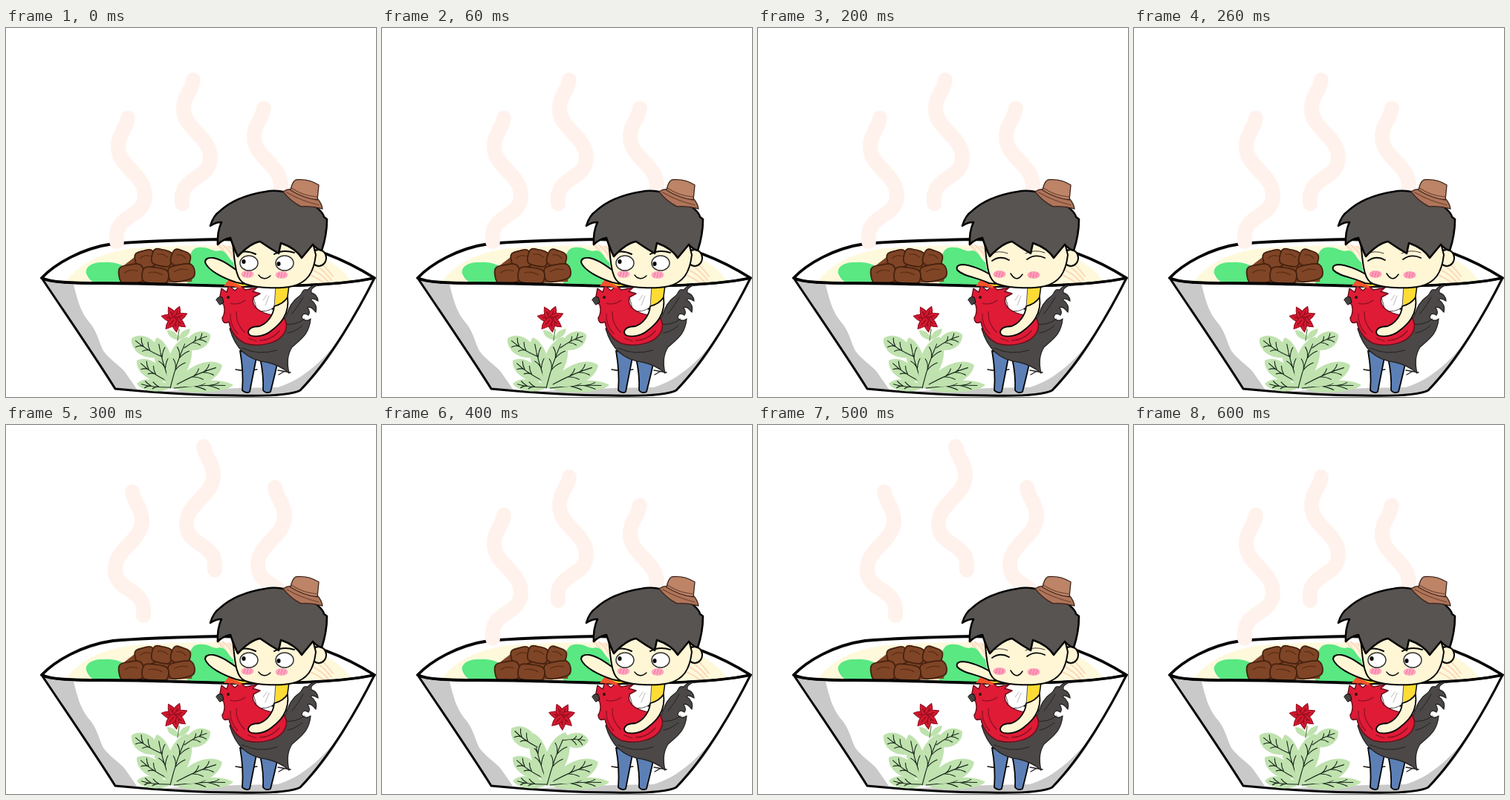
Animation of 498 by 496 pixels, one loop 700 ms. Source, as an HTML page with a canvas:

```html
<!DOCTYPE html>
<html>
<head>
<meta charset="utf-8">
<style>
html, body { margin: 0; width: 100%; height: 100%; overflow: hidden; background: #fff; }
canvas { display: block; width: 498px; height: 496px; }
</style>
</head>
<body>
<canvas id="c" width="498" height="496"></canvas>
<script>
const ctx = document.getElementById('c').getContext('2d');
ctx.lineCap = ctx.lineJoin = 'round';

const INK = '#050505', SKIN = '#fff6d6', RED = '#df1b36', DARK = '#4b4847';
const BROWN = '#7f4526', LEAF = '#bfe2ae', STEAM = '#fff2ec', SHADE = '#c9c9c9';

function shape(d, fill, stroke, w = 2) {
  const p = new Path2D(d);
  if (fill) { ctx.fillStyle = fill; ctx.fill(p); }
  if (stroke) { ctx.strokeStyle = stroke; ctx.lineWidth = w; ctx.stroke(p); }
}
function oval(x, y, rx, ry, fill, stroke, w = 2) {
  ctx.beginPath();
  ctx.ellipse(x, y, rx, ry, 0, 0, Math.PI * 2);
  if (fill) { ctx.fillStyle = fill; ctx.fill(); }
  if (stroke) { ctx.strokeStyle = stroke; ctx.lineWidth = w; ctx.stroke(); }
}
function at(x, y, turn, paint) {
  ctx.save();
  ctx.translate(x, y);
  ctx.rotate(turn);
  paint();
  ctx.restore();
}

const BODY = 'M48 336 C60 342 88 343 130 343 C210 343 260 347 330 347 C400 347 460 344 496 336 C476 376 438 444 396 487 C385 493 350 495 310 494 C250 494 190 489 147 485 C116 436 80 384 48 336 Z';
const INSIDE = 'M48 336 C66 317 102 296 144 290 C190 286 240 285 290 284 C350 285 400 293 432 304 C456 313 480 326 496 336 C460 344 400 347 330 347 C260 347 210 343 130 343 C88 343 60 342 48 336 Z';

function bowl() {
  shape(INSIDE, '#fff');
  ctx.save();
  ctx.clip(new Path2D(INSIDE));
  shape('M78 344 C98 316 130 301 172 296 C250 290 350 290 410 303 C440 312 458 328 466 344 Z', '#fff9dc');
  for (let i = 0; i < 4; i++) {
    shape(`M${392 + i * 3} ${299 + i * 10} Q422 ${308 + i * 9} ${440 - i * 2} ${334 + i * 5}`, null, '#fcd9b8', 2);
    shape(`M${284 + i * 8} ${290 + i * 2} Q${296 + i * 8} 300 ${304 + i * 8} 320`, null, '#fcdfc6', 3);
  }
  shape('M108 330 C106 320 118 314 132 315 C146 314 156 318 166 325 L166 345 L124 345 Q112 341 108 330 Z', '#59e882');
  shape('M246 318 C246 302 252 293 264 295 C274 294 278 302 288 299 C298 300 298 309 306 315 L312 348 L244 346 Z', '#59e882');
  ctx.restore();
  meat();
  shape(BODY, '#fff');
  shape('M50 339 C60 343 80 344 91 345 C96 365 100 380 110 393 C123 407 124 420 131 434 C142 449 157 455 164 468 L178 488 L147 485 C116 436 80 384 50 339 Z', SHADE);
  shape('M200 489 Q280 484 366 483 C408 470 440 434 466 393 C446 430 424 463 396 487 C385 493 350 495 310 494 Q250 494 200 489 Z', SHADE);
  shape(INSIDE, null, INK, 3.8);
  shape(BODY, null, INK, 3);
}

// Chunk of meat centred on (x,y)
function chunk(x, y, rx, ry, turn) {
  at(x, y, turn, () => {
    shape(`M${-rx} 0 C${-rx} ${-ry * 1.2} ${-rx * .6} ${-ry} 0 ${-ry} C${rx * .8} ${-ry} ${rx} ${-ry * .8} ${rx} 0 C${rx} ${ry} ${rx * .7} ${ry} 0 ${ry} C${-rx * .8} ${ry} ${-rx} ${ry * .9} ${-rx} 0 Z`, BROWN, '#45210f', 1.8);
    shape(`M${-rx * .5} ${-ry * .3} Q0 ${-ry * .6} ${rx * .5} ${-ry * .2}`, null, '#5c2e16', 1.3);
  });
}
function meat() {
  shape('M152 337 L160 318 L182 301 L238 302 L253 322 L250 341 L158 344 Z', BROWN);
  chunk(188, 311, 14, 12, -.3);
  chunk(210, 309, 14, 11, .2);
  chunk(235, 310, 13, 11, .3);
  chunk(169, 331, 17, 13, -.2);
  chunk(236, 329, 18, 11, -.2);
  chunk(201, 333, 18, 11, .1);
}

// One wavy plume; dir -1 mirrors it
function plume(x, y, dir) {
  ctx.save();
  ctx.translate(x, y);
  ctx.scale(dir, 1);
  shape('M0 0 C2 15 14 22 13 40 C12 66 -23 76 -23 104 C-23 136 20 128 15 166', null, STEAM, 20);
  ctx.restore();
}
function steam(up) {
  if (up) {
    plume(170, 90, 1); plume(266, 29, 1); plume(362, 84, 1);
  } else {
    plume(164, 121, -1); plume(252, 70, -1); plume(347, 108, -1);
  }
}

// Leaf from base (x,y) to tip (u,v), half width w, with veins
function leaf(x, y, u, v, w) {
  const len = Math.hypot(u - x, v - y);
  at(x, y, Math.atan2(v - y, u - x), () => {
    shape(`M0 0 C${len * .2} ${-w * 1.3} ${len * .8} ${-w * 1.7} ${len} 0 C${len * .8} ${w * 1.7} ${len * .2} ${w * 1.3} 0 0 Z`, LEAF);
    let veins = `M0 0 Q${len * .5} -3 ${len * .86} 0`;
    for (const k of [.35, .58]) {
      for (const s of [-1, 1]) veins += ` M${len * k} -1 Q${len * (k + .12)} ${s * w * .2} ${len * (k + .18)} ${s * w * .65}`;
    }
    shape(veins, null, '#17251a', 1.1);
  });
}

function flower(x, y, turn) {
  at(x, y, turn, () => {
    for (const deg of [-165, -115, -65, -20, 40, 85, 135]) {
      at(0, 0, deg * Math.PI / 180, () => {
        shape('M-1 -3 C6 -7 11 -5 18 -1 C12 4 6 6 -1 3 Z', '#d3192e', '#920d20', 1);
        shape('M2 0 L11 -1', null, '#790919', 1);
      });
    }
  });
}

function plant(bent) {
  shape('M216 484 L208 450 L216 444 L226 462 L238 462 L262 474 L246 485 Z', LEAF);
  leaf(216, 474, 176, 447, 10);
  leaf(222, 483, 176, 478, 7);
  leaf(226, 484, 306, 480, 7);
  leaf(230, 479, 291, 453, 12);
  leaf(222, 480, 203, bent ? 414 : 416, 10);
  if (bent) {
    leaf(209, 433, 174, 408, 11);
    leaf(222, 484, 247, 413, 13);
    leaf(243, 424, 278, 424, 9);
    flower(242, 392, .1);
  } else {
    leaf(208, 441, 169, 417, 11);
    leaf(221, 484, 244, 415, 13);
    leaf(240, 430, 275, 412, 10);
    shape('M230 419 Q217 416 217 406 Q228 406 232 416 Q237 405 248 404 Q247 415 234 419 Z', LEAF);
    shape('M231 420 L233 405', null, '#5d8a4c', 1.3);
    flower(227, 391, 0);
  }
}

function rooster() {
  shape('M338 459 Q322 462 309 459 M366 460 L383 463 M374 462 L367 466', null, '#222', 1.4);
  // jeans
  shape('M315 434 L338 438 Q333 464 328 489 Q323 492 318 487 Q320 462 315 434 Z', '#5c80b6', INK, 1.8);
  shape('M342 444 L368 438 Q362 466 356 489 Q350 492 346 487 Q347 466 342 444 Z', '#5c80b6', INK, 1.8);
  // tail and belly
  shape('M372 395 C380 388 378 372 394 361 C401 357 397 350 406 352 Q412 345 419 346 Q409 350 411 356 Q419 358 420 367 Q412 362 410 365 Q420 372 417 382 Q410 373 406 376 Q410 382 407 386 Q399 381 398 390 Q404 396 410 391 C408 412 397 418 385 429 Q376 443 381 464 Q369 453 350 449 C325 446 309 432 301 404 Z', DARK, '#262525', 1.3);
  shape('M376 398 Q390 400 402 391 M379 410 Q390 408 399 400 M385 384 Q392 376 400 362 M318 430 Q340 441 365 433', null, '#222', 1);
  // shirt
  shape('M356 346 L381 346 L378 368 L358 378 Z', '#ffdc35', INK, 1.5);
  shape('M330 349 L363 347 L361 375 Q350 384 338 379 Z', '#fff', '#555', 1);
  shape('M354 360 L349 373 M346 366 L351 359', null, '#bbb', 1);
  // comb, head and breast in one outline
  shape('M288 361 L290 350 L297 355 L300 346 L308 353 L316 346 L322 352 L338 349 L332 354 L342 357 L333 362 Q330 372 340 379 Q348 385 374 389 Q381 400 374 411 C365 425 339 429 322 424 C308 417 302 405 300 395 Q292 399 291 390 Q296 382 293 372 L288 368 Z', RED, '#67101c', 1.5);
  shape('M283 365 Q286 360 291 362 L293 369 L288 372 Z', '#45413f', INK, 1);
  oval(299, 362, 1.8, 2, '#1b1011');
  shape('M302 384 Q301 400 312 411 M310 381 Q309 397 321 409 M341 420 Q357 420 368 407 M326 417 L337 421 M302 370 Q312 373 322 366', null, '#8b1023', 1.2);
  // holding arm
  shape('M361 374 Q373 371 379 362 C382 385 369 398 357 407 C346 416 327 417 326 409 Q327 401 341 401 C352 397 360 386 361 374 Z', SKIN, INK, 1.8);
}

function arm(low) {
  shape('M293 347 L300 338 L318 340 L316 350 Q304 346 293 347 Z', '#f5522c');
  shape('M306 342 L324 333 L330 346 L318 347 Z', '#ffdc35');
  shape(low
    ? 'M318 335 C302 324 284 318 274 318 Q266 319 268 325 C276 334 295 335 311 343 L320 344'
    : 'M319 332 C304 321 291 311 279 309 Q268 308 268 315 C272 326 292 336 310 342 L320 344', SKIN, INK, 2);
}

function face(shut) {
  oval(421, 309, 10, 11, SKIN, INK, 2);
  shape('M305 288 C308 313 308 339 322 344 C341 351 373 350 386 347 C405 342 414 330 417 305 L410 278 L320 278 Z', SKIN, INK, 2);
  for (const [x, y] of [[325, 331], [371, 332]]) {
    oval(x, y, 8.5, 5, shut ? '#ff9fba' : '#ffa9c1');
    for (let i = -1; i < 2; i++) shape(`M${x + i * 4 + 1} ${y - 3} l-2 6`, null, '#e9608b', .8);
  }
  if (shut) {
    shape('M315 313 Q326 305 338 312 M362 311 Q373 303 386 309', null, INK, 1.8);
    shape('M312 304 Q324 298 336 303 M360 303 Q373 297 386 302', null, '#443a33', 1);
    shape('M340 330 Q348 343 356 331', null, INK, 1.5);
  } else {
    oval(327, 316, 12, 10, '#fff', '#333', 1.5);
    oval(375, 316, 12, 10, '#fff', '#333', 1.5);
    oval(320, 314, 2.6, 3, INK);
    oval(367, 317, 2.6, 3, INK);
    shape('M313 302 Q324 298 336 304 M361 304 Q373 297 388 302', null, INK, 2);
    shape('M340 332 Q347 341 356 333', null, INK, 1.4);
  }
}

function hair() {
  shape('M285 291 Q284 274 290 261 Q282 261 275 266 Q279 252 288 246 C302 233 324 224 349 220 C368 216 384 222 399 230 C416 237 427 248 428 254 L432 257 Q432 278 425 299 Q419 298 413 291 L398 309 Q390 296 370 289 L367 303 Q355 296 342 287 Q329 289 312 307 Q307 297 302 282 Q292 284 285 291 Z', '#585452', INK, 2.6);
}

function hat() {
  shape('M373 220 Q382 214 391 219 L419 229 Q425 236 426 243 Q411 239 397 240 Q383 233 373 220 Z', '#b0755a', '#432b21', 1.4);
  shape('M383 218 Q385 207 390 204 Q406 202 421 211 L419 231 Q400 229 383 218 Z', '#bd8467', '#432b21', 1.4);
  shape('M384 215 Q400 226 419 227 M378 221 Q396 232 421 238', null, '#70432f', 1.2);
}

function draw(n) {
  const shut = n % 3 === 2;
  ctx.fillStyle = '#fff';
  ctx.fillRect(0, 0, 498, 496);
  bowl();
  steam(n % 2 === 1);
  plant(n % 3 === 1);
  rooster();
  arm(shut);
  face(shut);
  hair();
  hat();
}

const start = performance.now();
let shown = -1;
function tick() {
  const n = Math.floor((performance.now() - start) % 700 / 100);
  if (n !== shown) draw(shown = n);
  requestAnimationFrame(tick);
}
tick();
</script>
</body>
</html>
```
